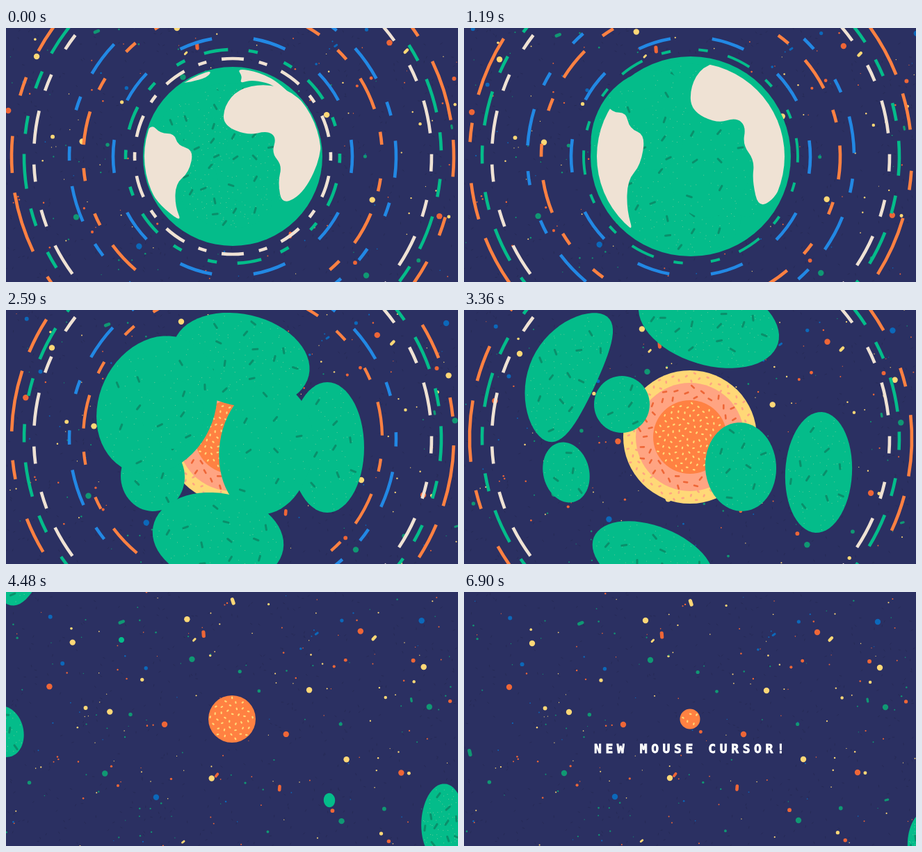
These frames come from a looping animation (650 by 366 pixels, 8 s). An HTML page with a canvas:

```html
<!DOCTYPE html>
<html lang="en">
<head>
<meta charset="utf-8">
<title>New mouse cursor</title>
<style>
  html, body { margin: 0; width: 100%; height: 100%; overflow: hidden; background: #2b3062; }
  canvas { display: block; }
  p {
    position: absolute; left: 187px; top: 215px; margin: 0;
    font: bold 18px/21px "DejaVu Sans Mono", monospace;
    letter-spacing: 5.6px; white-space: nowrap; color: #fff;
    -webkit-text-stroke: .8px #fff;
  }
</style>
</head>
<body>
<canvas width="650" height="366"></canvas>
<p>NEW MOUSE CURSOR!</p>
<script>
const ctx = document.querySelector('canvas').getContext('2d');
const label = document.querySelector('p');
const LOOP = 8000, STEP = 70, STOP = 4900, BLINK = 500;
const CX = 326, CY = 185, TAU = Math.PI * 2, RAD = Math.PI / 180, GOLDEN = 2.39996;
const NAVY = '#2b3062', GREEN = '#04bc8a', LEAF = '#0a8f6b', CREAM = '#efe2d4',
      ORANGE = '#ff8142', SALMON = '#ffa482', YELLOW = '#ffd877', RED = '#ee6637',
      BLUE = '#2288e4', DEEP = '#0c68ba', TEAL = '#109873';

// Shared key times; every track lists its values at these moments.
const TIMES = [0, 1190, 1750, 2590, 3360, 4480, 4900];
const clamp = v => Math.max(0, Math.min(1, v));
const mix = (a, b, k) => Array.isArray(a) ? a.map((v, i) => mix(v, b[i], k)) : a + (b - a) * k;
function track(values, t) {
  let i = 0;
  while (i < TIMES.length - 2 && t >= TIMES[i + 1]) i++;
  return mix(values[i], values[i + 1], clamp((t - TIMES[i]) / (TIMES[i + 1] - TIMES[i])));
}
function generator(seed) {
  return () => (seed = (seed * 16807) % 2147483647) / 2147483647;
}

function disc(x, y, r, color) {
  ctx.fillStyle = color;
  ctx.beginPath();
  ctx.arc(x, y, Math.max(0, r), 0, TAU);
  ctx.fill();
}
function dash(x, y, length, width, angle, color) {
  const dx = Math.cos(angle) * length / 2, dy = Math.sin(angle) * length / 2;
  ctx.strokeStyle = color;
  ctx.lineWidth = width;
  ctx.beginPath();
  ctx.moveTo(x - dx, y - dy);
  ctx.lineTo(x + dx, y + dy);
  ctx.stroke();
}
// Smooth closed shape that runs through the middle of each side.
function blob(points) {
  const middle = i => mix(points[i], points[(i + 1) % points.length], .5);
  ctx.beginPath();
  ctx.moveTo(...middle(points.length - 1));
  points.forEach((p, i) => ctx.quadraticCurveTo(...p, ...middle(i)));
  ctx.fill();
}

// The brightest stars have fixed places, the rest are scattered.
const bright = {
  [YELLOW]: [[98, 74], [261, 41], [598, 109], [435, 142], [488, 241], [296, 268], [151, 173]],
  [RED]: [[65, 137], [229, 191], [566, 260], [402, 205], [508, 58]],
  [TEAL]: [[144, 261], [481, 329], [606, 166], [268, 98]],
  [DEEP]: [[217, 295], [595, 43]]
};
const rand = generator(41);
const stars = Object.entries(bright).flatMap(([color, places]) => places.map(([x, y]) => ({ x, y, r: 4.2, color })));
for (let i = 0; i < 240; i++) {
  const color = [YELLOW, RED, TEAL, RED, YELLOW, TEAL, DEEP][i % 7];
  const r = i < 45 ? 1.6 + rand() * 1.4 : .6 + rand() * .7;
  stars.push({ x: rand() * 650, y: rand() * 366, r, color, long: i < 45 && i % 4 === 0 });
}
const grain = Array.from({ length: 450 }, () => [rand() * 650, rand() * 366, rand() * 3]);

// Each letter of a pattern is one dash; dashes are spread evenly from the start angle.
const DEGREES = { B: 16, L: 13, M: 9.6, s: 5 };
const swirl = 'Ls' + 'Lss'.repeat(6);
const rings = [
  { r: 141, color: CREAM, end: 1000, start: 162, spin: 30, pattern: 'Ls'.repeat(10) },
  { r: 154, color: GREEN, end: 1700, start: 201, spin: 30, pattern: 'Lss'.repeat(6) },
  { r: 172, color: BLUE, end: 2200, start: 0, spin: 30.5, pattern: 'B'.repeat(10) },
  { r: 215, color: ORANGE, end: 3150, start: 299, spin: 25, slow: 1.7, pattern: swirl },
  { r: 235, color: BLUE, end: 3180, start: 325, spin: 25, slow: 1.7, pattern: swirl },
  { r: 286, color: CREAM, end: 3960, start: 148.5, spin: 0, pattern: 'Mss'.repeat(9) },
  { r: 300, color: GREEN, end: 3980, start: 343, spin: -17.7, pattern: 'MssMsMssMssMsssMssMssMssMsss' },
  { r: 318, color: ORANGE, end: 4000, start: 162.5, spin: -10.3, pattern: 'BMsBMsBMss'.repeat(2) }
];

// Lumps: x, y, rx, ry, turn when packed and when open; then x, y, scale far away.
const lumps = [
  { packed: [211, 240, 46, 50, -5], open: [147, 234, 33, 44, -14], far: [-3, 201, .85] },
  { packed: [305, 329, 95, 65, 10], open: [272, 362, 92, 50, 22], far: [190, 480, 1] },
  { packed: [338, 72, 100, 66, 13], open: [352, 18, 104, 61, 17], far: [430, -120, 1] },
  { packed: [217, 137, 83, 103, 25], open: [143, 90, 49, 100, 25], far: [26, -76, .95], bend: 18 },
  { packed: [462, 198, 53, 94, 0], open: [510, 234, 48, 87, 3], far: [628, 332, .64] },
  { packed: [374, 200, 67, 95, 8], open: [398, 226, 51, 64, -4], far: [465, 300, .16] },
  { packed: [240, 150, 45, 50, 0], open: [227, 136, 40, 41, 0], far: [166, 69, .1] }
].map(({ packed, open, far, bend = 0 }, index) => {
  const [px, py, prx, pry, turn] = packed;
  const gather = (pull, size) => [mix(CX, px, pull), mix(172, py, pull), prx * size, pry * size, turn];
  const leave = k => {
    const scale = mix(1, far[2], k);
    return [mix(open[0], far[0], k), mix(open[1], far[1], k), open[2] * scale, open[3] * scale, open[4]];
  };
  const random = generator(index * 977 + 5);
  const scatter = (n, reach) => Array.from({ length: n }, (_, i) => {
    const d = reach * Math.sqrt((i + .5) / n), a = i * GOLDEN + random() * .6;
    return [d * Math.cos(a), d * Math.sin(a), random() * 3];
  });
  const count = Math.round(open[2] * open[3] / 400);
  return {
    bend,
    keys: [gather(.45, .7), gather(.6, .9), gather(.7, 1.05), packed, open, leave(1), leave(1.3)],
    sprinkles: scatter(count, .86),
    specks: scatter(count * 8, .96)
  };
});

// Land: outline plus a track of [shift, slant, vertical stretch, drop].
const continents = [
  {
    outline: [[208,137], [222,152], [242,152], [247,169], [270,176], [263,208], [244,224], [243,256], [254,283], [205,240], [190,170]],
    moves: [[0, 0, 1, 0], [-9, 0, 1.354, -84], [-110, 0, 1.5, -110]]
  },
  {
    outline: [[314,112], [334,88], [372,80], [410,90], [450,130], [455,180], [430,236], [397,256], [391,222], [397,198],
      [382,180], [389,158], [376,148], [348,155], [312,140]],
    moves: [[0, 0, 1, 0], [10, .11, 1.23, -53], [160, .2, 1.4, -90]]
  },
  {
    outline: [[332,58], [340,70], [336,80], [355,74], [392,84], [440,140], [440,128], [395,80], [365,64]],
    moves: [[0, 0, 1, 0], [45, 0, 1, -45], [60, 0, 1, -60]]
  },
  {
    outline: [[246,80], [275,66], [296,61], [290,71], [265,78]],
    moves: [[0, 0, 1, 0], [-30, 0, 1, -60], [-40, 0, 1, -80]]
  }
];

function drawSky(t) {
  ctx.fillStyle = NAVY;
  ctx.fillRect(0, 0, 650, 366);
  for (const [x, y, a] of grain) dash(x, y, 2.5, 1, a, '#262a56');
  const spread = track([1, .975, .954, .922, .872, .816, .808], t) / .808;
  for (const { x, y, r, color, long } of stars) {
    const sx = mix(325, x, spread), sy = mix(213, y, spread);
    if (long) dash(sx, sy, r * 2, r * 1.8, x % 2 + 1, color);
    else disc(sx, sy, r, color);
  }
}

function drawRings(t) {
  const s = t / 1000;
  ctx.lineCap = 'butt';
  for (const { r, color, end, start, spin, slow = 0, pattern } of rings) {
    const fade = clamp((end - t) / 600);
    if (!fade) continue;
    ctx.strokeStyle = color;
    ctx.lineWidth = 4.6 * fade;
    [...pattern].forEach((kind, i) => {
      const angle = start + i * 360 / pattern.length + s * (spin - slow * s);
      const half = DEGREES[kind] / 2;
      ctx.beginPath();
      ctx.arc(CX, CY, r, (angle - half) * RAD, (angle + half) * RAD);
      ctx.stroke();
    });
  }
  ctx.lineCap = 'round';
}

function drawCore(t) {
  const x = 325, y = 183;
  const sprinkle = (from, to, spacing, length, width, color) => {
    for (let i = 1, d = spacing; d < to - 2.5; d = spacing * Math.sqrt(++i)) {
      const a = i * GOLDEN;
      if (d > from) dash(x + d * Math.cos(a), y + d * Math.sin(a), length, width, i * 1.7, color);
    }
  };
  const orange = track([53, 53, 53, 53, 53, 34, 14.5], t);
  const salmon = 78 * clamp((4260 - t) / 900), yellow = 96 * clamp((4160 - t) / 800);
  disc(x, y, yellow, YELLOW);
  sprinkle(salmon + 1, yellow, 6, 2, 2.6, SALMON);
  disc(x, y, salmon, SALMON);
  sprinkle(orange + 3, salmon, 7.6, 5, 2.6, RED);
  disc(x, y, orange, ORANGE);
  sprinkle(0, orange, 5.1, 1.6, 2.2, YELLOW);
}

function drawLump({ keys, bend, sprinkles, specks }, t) {
  const [x, y, rx, ry, turn] = track(keys, t);
  if (rx <= 0 || ry <= 0) return;
  const bow = bend * clamp((t - TIMES[3]) / (TIMES[4] - TIMES[3]));
  const place = (u, v) => [rx * u + bow * v * v, ry * v];
  ctx.save();
  ctx.translate(x, y);
  ctx.rotate(turn * RAD);
  ctx.fillStyle = GREEN;
  ctx.beginPath();
  for (let a = 0; a < TAU; a += TAU / 60) ctx.lineTo(...place(Math.cos(a), Math.sin(a)));
  ctx.fill();
  if (rx > 15) {
    ctx.fillStyle = 'rgba(225,222,175,.45)';
    for (const [u, v] of specks) ctx.fillRect(...place(u, v), 1, 1);
    for (const [u, v, a] of sprinkles) dash(...place(u, v), 7, 3, a, LEAF);
  }
  ctx.restore();
}

function drawLand(t) {
  if (t > 1960) return;
  const radius = track([127, 135, 158, 165], t);
  ctx.save();
  ctx.beginPath();
  ctx.arc(CX, CY, radius, 0, TAU);
  ctx.clip();
  ctx.fillStyle = CREAM;
  if (t < TIMES[2]) {
    for (const { outline, moves } of continents) {
      const [shift, slant, stretch, drop] = track(moves, t);
      blob(outline.map(([x, y]) => [x + shift + slant * (y - 100), y * stretch + drop]));
    }
  }
  // The last sliver of land slips over the upper left edge.
  const thick = 1 - Math.abs(t - TIMES[2]) / 250;
  if (thick > 0) {
    const edge = (angle, r) => [CX + r * Math.cos(angle * RAD), CY + r * Math.sin(angle * RAD)];
    ctx.beginPath();
    ctx.arc(CX, CY, radius, 191 * RAD, 246 * RAD);
    ctx.quadraticCurveTo(...edge(219, radius + 20 - 24 * thick), ...edge(191, radius));
    ctx.fill();
  }
  ctx.restore();
}

function frame(now) {
  const time = now % LOOP;
  const t = Math.min(STOP, Math.floor(time / STEP) * STEP);
  drawSky(t);
  drawRings(t);
  drawCore(t);
  if (t < TIMES[3]) disc(CX, CY, track([129, 144, 143, 0], t), GREEN);
  for (const lump of lumps) drawLump(lump, t);
  drawLand(t);
  const blink = Math.floor((time - STOP) / BLINK);
  label.hidden = time < STOP || (blink < 4 && blink % 2 === 1);
  requestAnimationFrame(() => frame(performance.now() - start));
}
const start = performance.now();
frame(0);
</script>
</body>
</html>
```
